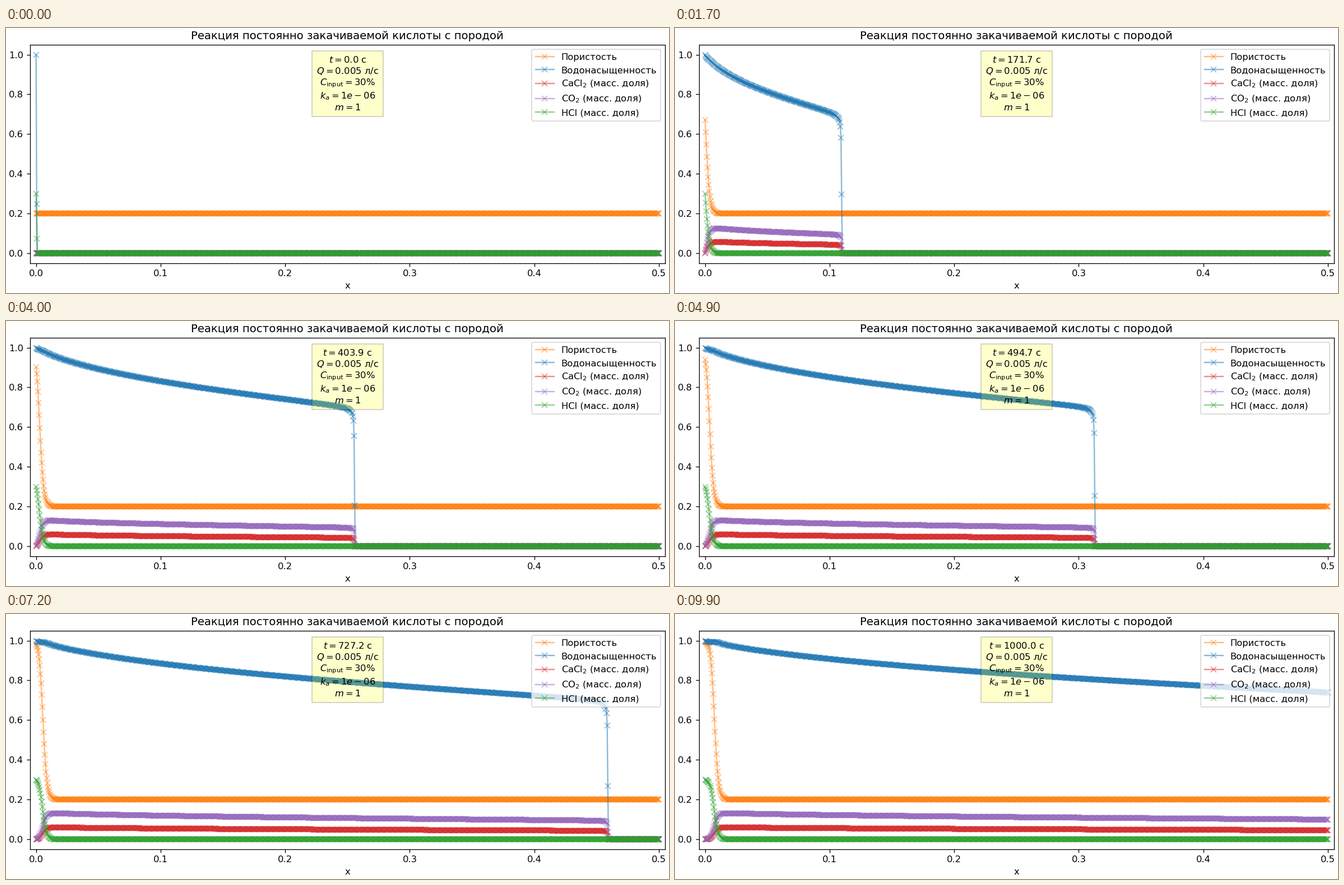
Write a matplotlib script that moves like this. It is 1183x473 px and loops after 10 s.

```python
import numpy as np
import matplotlib.pyplot as plt
from matplotlib.animation import FuncAnimation

W, H, DPI = 1183, 473, 118.3
FRAMES, INTERVAL = 100, 100
plt.rcParams["font.family"] = "DejaVu Sans"

# Model parameters
LENGTH, CELLS = 0.5, 1000
T_END, STEPS = 1000.0, 3600
PHI0 = 0.2            # initial porosity
FLUX = 1.0255e-4      # Darcy velocity
TAU = 193.0           # dissolution time at the inlet
RATE = 0.34           # acid uptake per cell of fresh rock
C_ACID, C_SALT, C_GAS = 0.3, 0.062, 0.135

x = np.linspace(0, LENGTH, CELLS)
dt = T_END / STEPS
courant = FLUX * dt / (x[1] - x[0])


def water_flow(s):
    """Fractional flow of the water phase."""
    return s**2 / (s**2 + 1.08 * (1 - s)**2.15)


def simulate():
    """Upwind two-phase flow with acid dissolving the rock."""
    s, u = np.zeros(CELLS), np.zeros(CELLS)
    phi = np.full(CELLS, PHI0)
    s[:2] = 1, 0.25
    u[:3] = 1
    marks = {STEPS * i // (FRAMES - 1) for i in range(FRAMES)}
    states = []
    for step in range(STEPS + 1):
        if step in marks:
            states.append((step * dt, phi.copy(), s.copy(), u.copy()))
        if step == 0:
            s[1:3] = 0.57
        f = water_flow(s)
        gas = phi * (1 - s)
        gas[1:] += courant * np.diff(f)
        phi += (1 - phi) * u * dt / TAU
        s = np.clip(1 - gas / phi, 0, 1)
        s[0] = 1

        water = phi[1:] * np.maximum(s[1:], 1e-9)
        carried = np.minimum(courant * f[:-1] / water, 1)
        uptake = RATE * courant * (1 - phi[1:]) / (1 - PHI0) / water
        u[1:] = (u[1:] - carried * np.diff(u)) / (1 + uptake)
    return states


states = simulate()

fig, ax = plt.subplots(figsize=(W / DPI, H / DPI), dpi=DPI,
                       layout="constrained")
ax.set(xlim=(-0.005, 0.505), ylim=(-0.05, 1.05),
       xticks=np.arange(6) / 10, yticks=np.arange(6) / 5, xlabel="x",
       title="Реакция постоянно закачиваемой кислоты с породой")

SERIES = [
    ("Пористость", "tab:orange"),
    ("Водонасыщенность", "tab:blue"),
    ("CaCl$_2$ (масс. доля)", "tab:red"),
    ("CO$_2$ (масс. доля)", "tab:purple"),
    ("HCl (масс. доля)", "tab:green"),
]
lines = [ax.plot(x, np.zeros(CELLS), marker="x", color=color, alpha=0.5,
                 label=label)[0] for label, color in SERIES]
ax.legend(loc="upper right")

info = ax.text(0.5, 0.95, "", transform=ax.transAxes, ha="center", va="top",
               bbox=dict(boxstyle="square,pad=0.5", facecolor="yellow",
                         alpha=0.2))
PARAMS = "\n".join([r"$Q = 0.005$ л/с", r"$C_{\mathrm{input}} = 30\%$",
                    r"$k_a = 1e-06$", r"$m = 1$"])

# Lay out once, then keep the axes fixed
fig.draw_without_rendering()
fig.set_layout_engine("none")


def update(i):
    t, phi, s, u = states[i]
    curves = (phi, s, C_SALT * s * (1 - u), C_GAS * s * (1 - u),
              C_ACID * s * u)
    for line, y in zip(lines, curves):
        line.set_ydata(y)
    info.set_text(f"$t = {t:.1f}$ с\n{PARAMS}")
    return [*lines, info]


anim = FuncAnimation(fig, update, frames=FRAMES, interval=INTERVAL,
                     repeat=True, repeat_delay=0)
plt.show()
```
